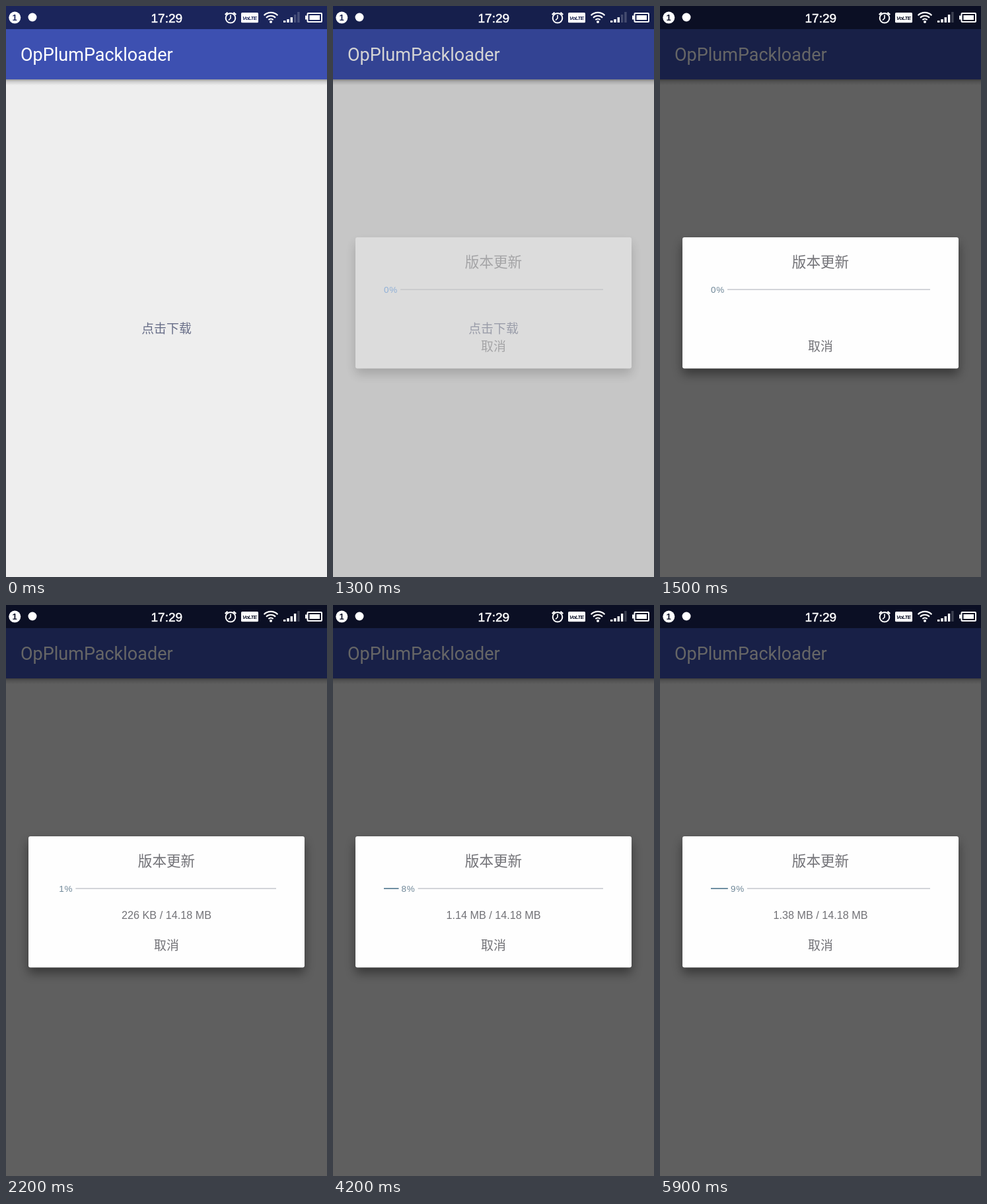
An HTML page that plays this animation: 486 by 864 pixels, repeating every 6100 ms.

```html
<!DOCTYPE html>
<html lang="zh">
<head>
<meta charset="utf-8">
<title>Download dialog</title>
<style>
  html, body { margin: 0; width: 100%; height: 100%; overflow: hidden; background: #eee; }
  svg { display: block; width: 100%; height: 100%; }
  .cjk { font-family: "Noto Sans CJK SC", "Noto Sans CJK", sans-serif; text-anchor: middle; }
  .latin { font-family: "Liberation Sans", Arial, sans-serif; }
  .line { fill: none; stroke: #fff; stroke-width: 2; }
</style>
</head>
<body>
<svg viewBox="0 0 486 864">
  <defs>
    <linearGradient id="barShadow" x1="0" y1="0" x2="0" y2="1">
      <stop offset="0" stop-color="#000" stop-opacity=".34"/>
      <stop offset=".4" stop-color="#000" stop-opacity=".13"/>
      <stop offset="1" stop-color="#000" stop-opacity="0"/>
    </linearGradient>
    <filter id="blur" x="-20%" y="-30%" width="140%" height="160%">
      <feGaussianBlur stdDeviation="8"/>
    </filter>
    <!-- White parts show as icons, black parts are cut out -->
    <mask id="icons" maskUnits="userSpaceOnUse" x="0" y="0" width="486" height="35">
      <g fill="#fff">
        <circle cx="13.3" cy="17.6" r="9"/>
        <circle cx="40" cy="17" r="6.5"/>
        <text class="latin" x="243.3" y="24.6" font-size="19" text-anchor="middle" stroke="#fff" stroke-width=".5">17:29</text>
        <g class="line">
          <circle cx="340" cy="18.3" r="7.3"/>
          <path d="M340 13.5V18.5L337 21.5" stroke-width="1.6"/>
          <path d="M331.8 13.2L335.6 9.8M348.2 13.2L344.4 9.8" stroke-width="2.4"/>
          <path d="M390.6 14.2A14.6 14.6 0 0 1 411.4 14.2M394 17.8A9.7 9.7 0 0 1 408 17.8M397.4 21.1A5 5 0 0 1 404.6 21.1" stroke-width="2.1"/>
          <rect x="456.5" y="11" width="21.5" height="13" rx="1"/>
        </g>
        <rect x="356" y="10" width="26" height="15.2" rx="1.5"/>
        <circle cx="401" cy="24" r="2"/>
        <g id="signal"></g>
        <rect x="453" y="14.5" width="3" height="6"/>
        <rect x="459.5" y="14" width="15.5" height="7"/>
      </g>
      <text class="latin" x="13" y="22.2" font-size="13" font-weight="bold" text-anchor="middle">1</text>
      <text class="latin" x="368.8" y="20.6" font-size="8" font-weight="bold" font-style="italic" letter-spacing="-.6" text-anchor="middle">VoLTE</text>
    </mask>
  </defs>

  <rect width="486" height="864" fill="#eee"/>
  <rect width="486" height="35.5" fill="#1b255b"/>
  <rect y="35" width="486" height="76" fill="#3d50b1"/>
  <rect y="111" width="486" height="9" fill="url(#barShadow)"/>
  <text x="22" y="83.3" font-size="27" fill="#fff" font-family="Roboto, sans-serif">OpPlumPackloader</text>
  <text class="cjk" x="243" y="494.8" font-size="18.9" fill="#686e88">点击下载</text>

  <rect id="scrim" width="486" height="864" opacity="0"/>
  <rect width="486" height="35" fill="#fff" mask="url(#icons)"/>

  <g id="dialog" opacity="0">
    <rect x="34" y="359" width="418" height="198" rx="3" opacity=".42" filter="url(#blur)"/>
    <rect x="34" y="350" width="418" height="198.5" rx="3" fill="#fefefe"/>
    <g fill="#727277">
      <text class="cjk" x="243" y="394.6" font-size="21.6">版本更新</text>
      <text class="cjk" x="243" y="521.6" font-size="18.9">取消</text>
      <text id="size" class="latin" x="243" y="475.4" font-size="16.2" text-anchor="middle"></text>
    </g>
    <rect id="reached" x="77" y="428" height="2" fill="#6f8fa2"/>
    <rect id="unreached" y="428.2" height="1.6" fill="#c8cad0"/>
    <text id="percent" class="latin" y="433.9" font-size="13.5" letter-spacing=".75"></text>
  </g>
</svg>

<script>
const LOOP = 6100, TOTAL_MB = 14.18;
const BAR = { left: 77, right: 409, gap: 4.05, label: 21 };

// [time in ms, value]
const FADE = [[1300, .4], [1400, .9], [1500, 1]];
const DIM = [[1300, .17], [1400, .44], [1500, .6]];
const LOADED_KB = [
  [2000, 60], [2600, 560], [2700, 610], [3000, 859], [3200, 930], [3300, 930],
  [3400, 970], [3900, 1110], [4100, 1110], [4200, 1168], [4600, 1290],
  [4800, 1290], [4900, 1320], [5000, 1350], [5700, 1350], [5800, 1385], [5900, 1413.5]
];

const $ = id => document.getElementById(id);
const set = (id, attrs) => {
  for (const key in attrs) $(id).setAttribute(key, attrs[key]);
};

function valueAt(table, t) {
  if (t < table[0][0]) return 0;
  const next = table.findIndex(([time]) => time > t);
  if (next < 0) return table[table.length - 1][1];
  const [t0, a] = table[next - 1], [t1, b] = table[next];
  return a + (b - a) * (t - t0) / (t1 - t0);
}

const formatSize = kb => kb < 1024 ? `${Math.floor(kb)} KB` : `${(kb / 1024).toFixed(2)} MB`;

const bars = [3, 5, 8, 12, 16].map((height, i) => {
  const bar = document.createElementNS($('signal').namespaceURI, 'rect');
  $('signal').append(bar);
  const attrs = { x: 420 + i * 5.3, y: 25 - height, width: 3.4, height };
  for (const key in attrs) bar.setAttribute(key, attrs[key]);
  return bar;
});

function draw(time) {
  const t = Math.floor(time / 100) * 100;
  set('scrim', { opacity: valueAt(DIM, t) });
  set('dialog', { opacity: valueAt(FADE, t) });

  const strength = t < 1500 ? 3 : 4;
  bars.forEach((bar, i) => bar.setAttribute('fill-opacity', i < strength ? 1 : .2));

  const kb = valueAt(LOADED_KB, t);
  const percent = Math.floor(kb / 1024 / TOTAL_MB * 100);
  const labelX = BAR.left + (BAR.right - BAR.left) * percent / 100;
  const restX = labelX + BAR.label + BAR.gap;
  set('reached', { width: Math.max(0, labelX - BAR.gap - BAR.left) });
  set('percent', { x: labelX, fill: t < 1500 ? '#4291f1' : '#6f8798' });
  set('unreached', { x: restX, width: BAR.right - restX });
  $('percent').textContent = `${percent}%`;
  $('size').textContent = kb ? `${formatSize(kb)} / ${TOTAL_MB} MB` : '';
}

const start = performance.now();
function tick() {
  draw((performance.now() - start) % LOOP);
  requestAnimationFrame(tick);
}
tick();
</script>
</body>
</html>
```
